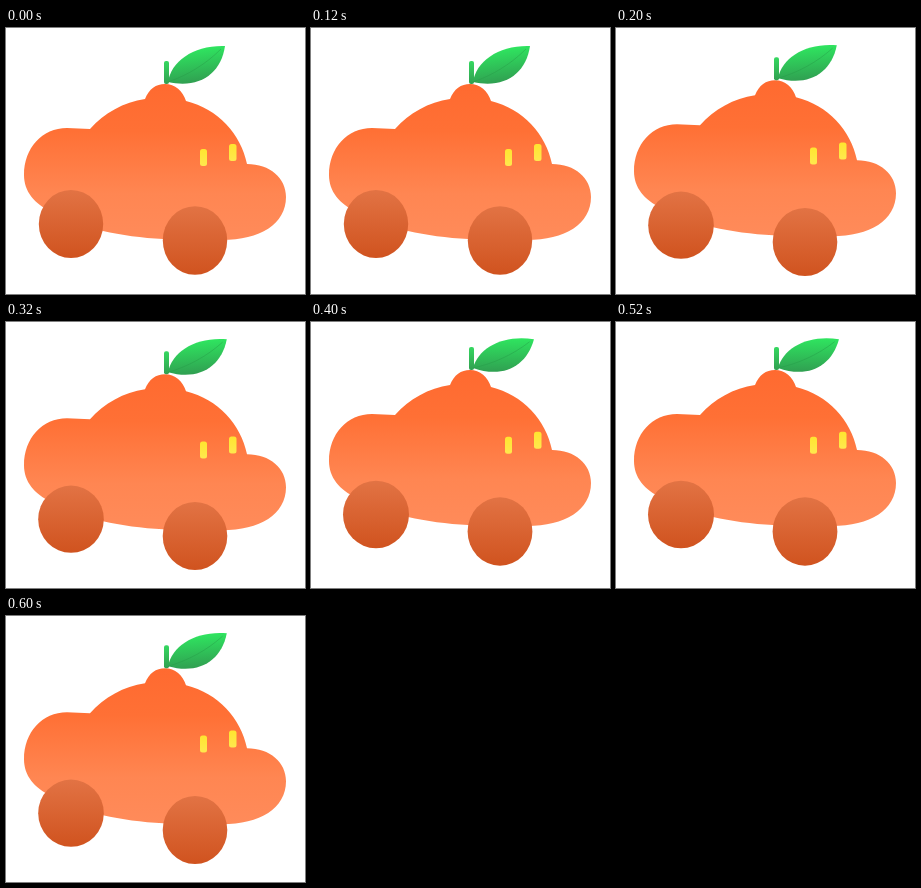
Recreate the animation shown at these times as an HTML page. Size 299 by 266 pixels, loop 0.8 s.

```html
<!DOCTYPE html>
<html lang="en">
<head>
<meta charset="utf-8">
<title>Orange car</title>
<style>
  html, body { margin: 0; width: 100%; height: 100%; overflow: hidden; background: #fff; }
  svg { display: block; width: 100vw; height: 100vh; }
</style>
</head>
<body>
<svg viewBox="0 0 299 266">
  <defs>
    <linearGradient id="peel" gradientUnits="userSpaceOnUse" x1="0" y1="56" x2="0" y2="212">
      <stop offset="0" stop-color="#ff6a30"/>
      <stop offset=".3" stop-color="#ff7035"/>
      <stop offset=".7" stop-color="#ff8652"/>
      <stop offset="1" stop-color="#ff8b5a"/>
    </linearGradient>
    <linearGradient id="tire" x1="0" y1="0" x2="0" y2="1">
      <stop offset="0" stop-color="#e27344"/>
      <stop offset="1" stop-color="#d0531f"/>
    </linearGradient>
    <linearGradient id="blade" x1=".4" y1="0" x2=".6" y2="1">
      <stop offset="0" stop-color="#2fec61"/>
      <stop offset="1" stop-color="#309b50"/>
    </linearGradient>
    <linearGradient id="twig" x1="0" y1="0" x2="0" y2="1">
      <stop offset="0" stop-color="#35d860"/>
      <stop offset="1" stop-color="#319f50"/>
    </linearGradient>
    <linearGradient id="lamp" x1="0" y1="0" x2="0" y2="1">
      <stop offset="0" stop-color="#ffe52f"/>
      <stop offset="1" stop-color="#ffe84e"/>
    </linearGradient>
  </defs>
  <g id="body">
    <path fill="url(#peel)" d="M18 147 C18 120 36 100 61 100 L84 101
      C98 85 118 74 139 71 C143 61 150 56 159 56 C169 56 177 63 180 73
      C212 81 235 106 241 136 C264 136 280 150 280 169
      C280 196 254 212 216 212 L157 211 C136 210 115 207 97 203
      L46 184 C28 176 18 163 18 147 Z"/>
    <rect x="158" y="33" width="5" height="23" rx="2" fill="url(#twig)"/>
  </g>
  <g id="leaf">
    <path fill="url(#blade)" d="M0 0 C3 -21 26 -37 57 -36 C53 -8 31 7 0 0 Z"/>
    <path fill="none" stroke="#279b49" stroke-opacity=".55" stroke-width=".8" d="M0 0 C20 -7 38 -18 53 -33"/>
  </g>
  <g id="eyes" fill="url(#lamp)">
    <rect x="194" y="121" width="7" height="17" rx="2.5"/>
    <rect x="223" y="116" width="7.5" height="17" rx="2.5"/>
  </g>
  <ellipse id="rear" cx="65" fill="url(#tire)"/>
  <ellipse id="front" cx="189" fill="url(#tire)"/>
</svg>
<script>
  const STEP = 200;
  const CYCLE = [0, 1, 2, 1];
  const POSES = [
    { lift: 0, tilt: 0, eyes: 0, rear: [196, 32.2, 34], front: [212.5, 32.2, 34.3] },
    { lift: -3.7, tilt: 3, eyes: -1.5, rear: [197.2, 32.8, 33.6], front: [214, 32.3, 34] },
    { lift: -8, tilt: 7, eyes: -6.3, rear: [192.5, 33, 33.7], front: [209.5, 32.4, 34.2] }
  ];
  const el = id => document.getElementById(id);
  const parts = {};
  for (const id of ["body", "leaf", "eyes", "rear", "front"]) parts[id] = el(id);

  const move = (id, value) => parts[id].setAttribute("transform", value);

  function setWheel(id, [cy, rx, ry]) {
    parts[id].setAttribute("cy", cy);
    parts[id].setAttribute("rx", rx);
    parts[id].setAttribute("ry", ry);
  }

  // The bounce holds each pose, without tweening.
  function draw(time) {
    const pose = POSES[CYCLE[Math.floor(time / STEP) % CYCLE.length]];
    move("body", `translate(0 ${pose.lift})`);
    move("leaf", `translate(162 ${54 + pose.lift}) rotate(${pose.tilt})`);
    move("eyes", `translate(0 ${pose.eyes})`);
    setWheel("rear", pose.rear);
    setWheel("front", pose.front);
  }

  const start = performance.now();
  function tick(now) {
    draw(Math.max(0, now - start));
    requestAnimationFrame(tick);
  }
  draw(0);
  requestAnimationFrame(tick);
</script>
</body>
</html>
```
